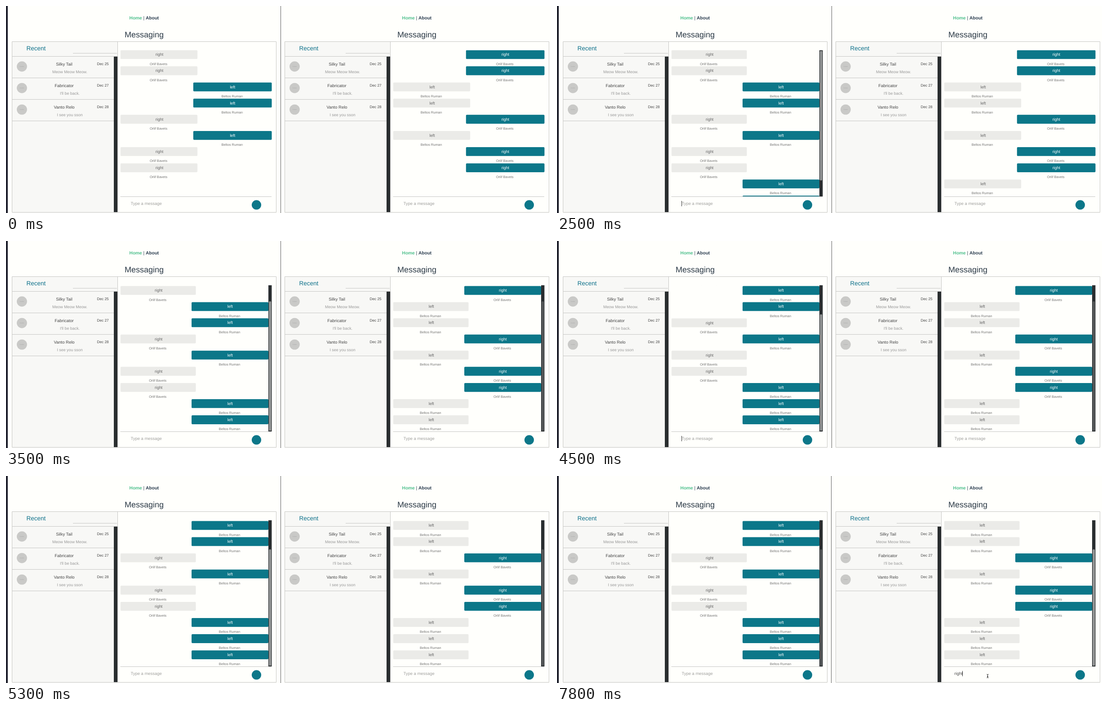
An HTML page that plays this animation: 1213 by 462 pixels, repeating every 8 s.

```html
<!DOCTYPE html>
<html lang="en">
<head>
<meta charset="utf-8">
<title>Messaging</title>
<style>
  html, body { margin: 0; width: 100%; height: 100%; overflow: hidden; background: #fffffc; }
  svg { display: block; font-family: "Liberation Sans", Arial, sans-serif; text-rendering: geometricPrecision; }
  .line { stroke: #c6c6c4; fill: none; }
  .mid { text-anchor: middle; }
  .nav { font-size: 10.15px; font-weight: bold; fill: #2c3e50; }
  .title { font-size: 18px; fill: #2c3a47; }
  .recent { font-size: 13.5px; fill: #0c7089; }
  .name { font-size: 9.45px; fill: #464646; }
  .date { font-size: 8.3px; fill: #464646; text-anchor: end; }
  .preview { font-size: 8.9px; fill: #989898; }
  .avatar { font-size: 3.4px; fill: #a9a9a9; }
  .label { font-size: 8.95px; }
  .author { font-size: 7.56px; fill: #747474; }
  .input { font-size: 9.45px; }
</style>
</head>
<body>
<svg id="stage" width="1213" height="462" viewBox="0 0 1213 462">
  <defs><clipPath id="list"><rect x="250" y="98.5" width="345" height="326.5"/></clipPath></defs>
</svg>
<script>
const LOOP = 8000, PITCH = 36.09, TOP = 98.5;
const TEAL = '#0c7789', DARK = '#292d2f';
const ORDER = 'RRLLRLRRLLL';
const AUTHORS = { R: 'Orlif Bavets', L: 'Beltos Ruman' };
const WORDS = { R: 'right', L: 'left' };
const CHATS = [
  ['Silky Tail', 'Dec 25', 'Meow Meow Meow.'],
  ['Fabricator', 'Dec 27', "I'll be back."],
  ['Vanto Relo', 'Dec 28', 'I see you sson']
];
// Scroll offset and thumb geometry for each list state.
const SCROLL = {
  top10: [0, 100, 289.5], end10: [34.2, 134.5, 289],
  mid11: [34.2, 131, 259.5], end11: [70.2, 163.5, 260]
};

// Each entry changes only the listed properties from its time on.
const START = { count: 8, scroll: '', text: '', caret: false, bright: false };
const LEFT = [
  [0, START],
  [700, { text: 'l', caret: true }], [800, { text: 'le' }], [900, { text: 'lef' }], [1000, { text: 'left' }],
  [1300, { text: '', count: 9 }],
  [1900, { text: 'le' }], [2000, { text: 'lef' }], [2200, { text: 'left' }],
  [2500, { text: '', count: 10, scroll: 'top10', bright: true }],
  [2900, { scroll: 'end10' }],
  [3200, { caret: false }],
  [3600, { text: 'le', caret: true }], [3700, { text: 'lef' }], [4000, { text: 'left' }],
  [4200, { text: '', count: 11, scroll: 'mid11' }],
  [4500, { scroll: 'end11' }],
  [4600, { caret: false }],
  [5600, { caret: true, bright: false }],
  [6900, { caret: false }]
];
const RIGHT = [
  [0, START],
  [1700, { count: 9 }],
  [2900, { count: 10, scroll: 'top10' }],
  [3500, { scroll: 'end10' }],
  [4600, { count: 11, scroll: 'mid11' }],
  [5300, { scroll: 'end11' }],
  [6900, { bright: true }],
  [7000, { caret: true }],
  [7400, { caret: false }],
  [7500, { text: 'r', caret: true }], [7700, { text: 'rig' }], [7800, { text: 'right' }]
];

const stage = document.getElementById('stage');

function add(parent, tag, attrs = {}, html = '') {
  const el = document.createElementNS('http://www.w3.org/2000/svg', tag);
  for (const key in attrs) el.setAttribute(key, attrs[key]);
  el.innerHTML = html;
  parent.append(el);
  return el;
}

const rect = (x, y, w, h, fill, rx = 0) =>
  `<rect x="${x}" y="${y}" width="${w}" height="${h}" rx="${rx}" fill="${fill}"/>`;
const line = (x1, x2, y) => `<path class="line" d="M${x1} ${y}H${x2}"/>`;
const text = (cls, x, y, str, extra = '') => `<text class="${cls}" x="${x}" y="${y}" ${extra}>${str}</text>`;

function chatRow([name, date, preview], i) {
  const y = 112.5 + i * 48.05;
  return `<circle cx="35.4" cy="${y + 22.5}" r="11.4" fill="#c9c9c7"/>` +
    text('avatar mid', 35.4, y + 23.6, 'Avatar') +
    text('name mid', 129.5, y + 20.2, name) +
    text('date', 228.7, y + 19, date) +
    text('preview mid', 142, y + 37.5, preview) +
    line(14, 240, 160.5 + i * 48);
}

const frameMarkup =
  text('nav', 274.6, 29.7, '<tspan fill="#4fc08d">Home</tspan><tspan font-weight="normal"> | </tspan>About', 'xml:space="preserve"') +
  text('title mid', 307.5, 69.8, 'Messaging') +
  rect(14, 80, 234, 381, '#f8f8f6') +
  text('recent', 45.4, 99, 'Recent') +
  line(149, 247, 105.5) + line(14, 248, 112.5) +
  CHATS.map(chatRow).join('') +
  rect(240, 113, 8, 348, DARK) +
  '<path class="line" d="M13.5 79.5H601.5V460.5H13.5ZM248.5 80V460"/>' +
  line(254.5, 591, 425.5) +
  `<circle cx="557.5" cy="443.9" r="10.6" fill="${TEAL}"/>`;

function bubble(kind, own, y, narrow) {
  const [x, w] = own ? (narrow ? [413, 171] : [416.8, 174.7]) : [254.8, narrow ? 167.7 : 171.3];
  const cx = x + w / 2;
  return rect(x, y, w, 19.8, own ? TEAL : '#ebebe8', 1.9) +
    text('label mid', cx + (own ? .2 : 1), y + 12.9, WORDS[kind], `fill="${own ? '#fff' : '#646464'}"`) +
    text('author mid', cx - 1, y + 33.2, AUTHORS[kind]);
}

function makePane(x, mine, events) {
  const pane = add(stage, 'g', { transform: `translate(${x} 0)` }, frameMarkup);
  const list = add(pane, 'g', { 'clip-path': 'url(#list)' });
  const input = add(pane, 'text', { class: 'input', x: 277.5, y: 444.4 });
  const caret = add(pane, 'rect', { y: 435, width: 1, height: 12, fill: '#333' });
  let shown = -1;

  return t => {
    const past = events.filter(e => e[0] <= t);
    if (past.length === shown) return;
    shown = past.length;
    const s = Object.assign({}, ...past.map(e => e[1]));
    const [offset, thumbY, thumbH] = SCROLL[s.scroll] || [0];
    let html = [...ORDER].slice(0, s.count)
      .map((kind, i) => bubble(kind, kind === mine, TOP + i * PITCH - offset, s.scroll)).join('');
    if (s.scroll) {
      html += rect(584, 98.5, 7.4, 327, DARK) +
        rect(585.3, thumbY, 4.7, thumbH, s.bright ? '#989a9a' : '#56595a', 2.3);
    }
    list.innerHTML = html;
    input.textContent = s.text || 'Type a message';
    input.setAttribute('fill', s.text ? '#4c4c4c' : '#a0a09e');
    caret.setAttribute('x', Math.floor(277.5 + (s.text ? input.getComputedTextLength() : 0)));
    caret.setAttribute('visibility', s.caret ? 'visible' : 'hidden');
  };
}

add(stage, 'rect', { width: 4, height: 462, fill: '#21232f' });
const panes = [makePane(0, 'L', LEFT), makePane(607, 'R', RIGHT)];
const divider = add(stage, 'rect', { y: 0, width: 1, height: 462, fill: '#5c5c5e' });
const pointer = add(stage, 'path', {
  d: 'M956.5 442.5q2 0 2 1.5v5q0 1.5-2 1.5M960.5 442.5q-2 0-2 1.5M958.5 449q0 1.5 2 1.5M957 447.5h3',
  fill: 'none', stroke: '#222'
});

function draw() {
  const t = performance.now() % LOOP;
  panes.forEach(update => update(t));
  divider.setAttribute('x', t < 6900 ? 611 : 610);
  pointer.setAttribute('visibility', t < 6800 ? 'hidden' : 'visible');
  requestAnimationFrame(draw);
}
draw();
</script>
</body>
</html>
```
